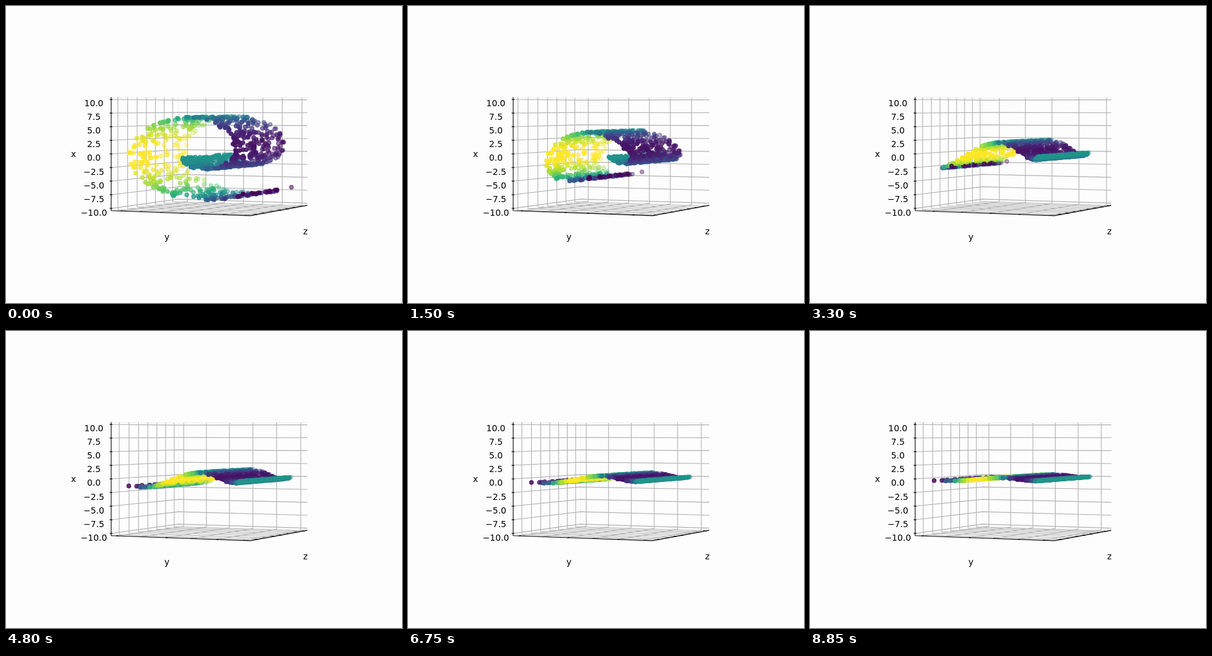
Write an HTML page with a canvas that moves like this. It is 640 by 480 pixels and loops after 9000 ms.

```html
<!DOCTYPE html>
<html lang="en">
<head>
<meta charset="utf-8">
<title>Unrolling a point cloud</title>
<style>
html, body { margin: 0; width: 100%; height: 100%; overflow: hidden; background: #fdfdfd; }
canvas { display: block; width: 640px; height: 480px; }
</style>
</head>
<body>
<canvas id="stage" width="640" height="480"></canvas>
<script>
const ctx = document.getElementById('stage').getContext('2d');
const STEP_MS = 150, STEPS = 60, COUNT = 1000;
const LIMIT = 10.42;

// Perspective: a runs along the y axis, b along the z axis (both 0..1), h is the height.
const depth = (a, b) => 0.1136 - 0.0052 * a + 0.0114 * b;
function project(a, b, h) {
  const d = depth(a, b);
  return [(19.312 + 23.508 * a + 15.518 * b) / d, 163 + (8.64 - h) / d];
}

// Spiral: radius at a few angles, angle 0 pointing down.
const ANGLES = [-1.1, 0, Math.PI / 2, Math.PI, Math.PI * 1.5, Math.PI * 2, 7];
const RADII = [1.3, 2.3, 4.5, 6.7, 7.5, 8.1, 9];

// Smooth curve through the values at ANGLES.
function curve(values, x) {
  const last = ANGLES.length - 1;
  let i = 0;
  while (i < last - 1 && x > ANGLES[i + 1]) i++;
  const slope = k => {
    const p = Math.max(0, k - 1), q = Math.min(last, k + 1);
    return (values[q] - values[p]) / (ANGLES[q] - ANGLES[p]);
  };
  const w = ANGLES[i + 1] - ANGLES[i], t = (x - ANGLES[i]) / w;
  const t2 = t * t, t3 = t2 * t;
  return (2 * t3 - 3 * t2 + 1) * values[i] + (t3 - 2 * t2 + t) * w * slope(i)
    + (3 * t2 - 2 * t3) * values[i + 1] + (t3 - t2) * w * slope(i + 1);
}

// step, y range, y zero, z tick centre, z tick gap, then the a position at each of ANGLES
const KEYS = [
  [0, 16.9, 0.5165, 0.5, 0.136, 0.49, 0.56, 0.84, 0.56, 0.10, 0.56, 0.92],
  [6, 24.1, 0.55, 0.5, 0.135, 0.545, 0.64, 0.86, 0.51, 0.175, 0.46, 0.72],
  [15, 39.8, 0.54, 0.47, 0.148, 0.81, 0.85, 0.74, 0.54, 0.285, 0.145, 0.285],
  [22, 48.3, 0.55, 0.47, 0.123, 0.86, 0.835, 0.75, 0.57, 0.35, 0.14, 0.235],
  [32, 55, 0.588, 0.521, 0.137, 0.905, 0.87, 0.77, 0.61, 0.41, 0.19, 0.095],
  [45, 56, 0.583, 0.521, 0.134, 0.885, 0.852, 0.76, 0.605, 0.415, 0.2, 0.10],
  [59, 57.3, 0.576, 0.506, 0.132, 0.87, 0.837, 0.745, 0.6, 0.415, 0.2, 0.105]
];

function stateAt(step) {
  let i = 0;
  while (i < KEYS.length - 2 && step >= KEYS[i + 1][0]) i++;
  const from = KEYS[i], to = KEYS[i + 1];
  const t = (step - from[0]) / (to[0] - from[0]);
  const v = from.map((x, k) => x + (to[k] - x) * t);
  return { range: v[1], zero: v[2], zMid: v[3], zGap: v[4], nodes: v.slice(5) };
}

const VIRIDIS = ['440154', '482878', '3e4a89', '31688e', '26828e', '1f9e89', '35b779', '6dcd59', 'b4de2c', 'fde725']
  .map(c => [0, 2, 4].map(k => parseInt(c.slice(k, k + 2), 16)));

function viridis(v) {
  const x = Math.min(1, Math.max(0, v)) * 9, i = Math.min(8, Math.floor(x));
  return VIRIDIS[i].map((c, k) => Math.round(c + (VIRIDIS[i + 1][k] - c) * (x - i))).join(',');
}

let seed = 20117;
function random() {
  seed = (seed * 1664525 + 1013904223) % 4294967296;
  return seed / 4294967296;
}

const points = Array.from({ length: COUNT }, () => {
  const angle = -1.1 + 8.1 * Math.pow(random(), 1.2);
  const r = curve(RADII, angle);
  const y = r * Math.sin(angle);
  return { angle, y, x: -r * Math.cos(angle), b: 0.064 + 0.872 * random(), rgb: viridis((5.4 - y) / 12.7) };
});

function line(color, width, ...path) {
  ctx.strokeStyle = color;
  ctx.lineWidth = width;
  ctx.beginPath();
  path.forEach(p => ctx.lineTo(...p));
  ctx.stroke();
}

function ticks(mid, gap) {
  const list = [];
  for (let k = -10; k <= 10; k++) {
    const v = mid + k * gap;
    if (v >= 0 && v <= 1) list.push(v);
  }
  return list;
}

function drawAxes(s) {
  const grid = (...path) => line('#b0b0b0', 1.1, ...path);
  const axis = (...path) => line('#000', 1.1, ...path);
  const step = [2, 2.5, 5, 10].find(v => s.range / v < 8.25);
  const yTicks = ticks(s.zero, step / s.range);
  const zTicks = ticks(s.zMid, s.zGap);

  for (const h of [LIMIT, -LIMIT]) {
    line('#f0f0f0', 1, project(0, 0, h), project(0, 1, h), project(1, 1, h));
  }
  line('#f0f0f0', 1, project(0, 1, LIMIT), project(0, 1, -LIMIT));

  for (let h = -10; h <= 10; h += 2.5) {
    grid(project(0, 0, h), project(0, 1, h), project(1, 1, h));
  }
  for (const a of yTicks) grid(project(a, 0, -LIMIT), project(a, 1, -LIMIT), project(a, 1, LIMIT));
  for (const b of zTicks) grid(project(1, b, -LIMIT), project(0, b, -LIMIT), project(0, b, LIMIT));

  axis(project(0, 0, LIMIT), project(0, 0, -LIMIT), project(1, 0, -LIMIT), project(1, 1, -LIMIT));
  for (const a of yTicks) axis(project(a, -0.01, -LIMIT), project(a, 0.02, -LIMIT));
  for (const b of zTicks) axis(project(1.008, b, -LIMIT), project(0.984, b, -LIMIT));

  ctx.fillStyle = '#000';
  ctx.font = '13.89px "DejaVu Sans", sans-serif';
  ctx.textAlign = 'center';
  for (let k = 0; k <= 8; k++) {
    const h = 10 - 2.5 * k;
    const y = project(0, 0, h)[1];
    axis([167.5, y - 0.2], [172, y + 0.2]);
    ctx.fillText(h.toFixed(1).replace('-', '\u2212'), 142, 162 + 22.1 * k);
  }
  ctx.fillText('x', 109, 244);
  ctx.fillText('y', 260, 378);
  ctx.fillText('z', 484, 369);
}

function drawCloud(s, step) {
  const shrink = Math.pow(0.95, step);
  const sway = shrink / s.range;
  const rest = s.nodes.map((a, i) => a - sway * RADII[i] * Math.sin(ANGLES[i]));
  const dots = points.map(p => {
    const a = curve(rest, p.angle) + sway * p.y;
    return { pos: project(a, p.b, p.x * shrink), d: depth(a, p.b), rgb: p.rgb };
  }).sort((p, q) => q.d - p.d);
  const far = dots[0].d, near = dots[COUNT - 1].d;

  ctx.lineWidth = 1.39;
  for (const { pos, d, rgb } of dots) {
    const alpha = 1 - 0.7 * (d - near) / (far - near);
    ctx.fillStyle = ctx.strokeStyle = `rgba(${rgb},${alpha})`;
    ctx.beginPath();
    ctx.arc(pos[0], pos[1], 3.1, 0, Math.PI * 2);
    ctx.fill();
    ctx.stroke();
  }
}

function draw(step) {
  const s = stateAt(step);
  ctx.fillStyle = '#fdfdfd';
  ctx.fillRect(0, 0, 640, 480);
  drawAxes(s);
  drawCloud(s, step);
}

const start = performance.now();
let shown = -1;
function tick() {
  const step = Math.floor(Math.max(0, performance.now() - start) / STEP_MS) % STEPS;
  if (step !== shown) draw(shown = step);
  requestAnimationFrame(tick);
}
tick();
</script>
</body>
</html>
```
